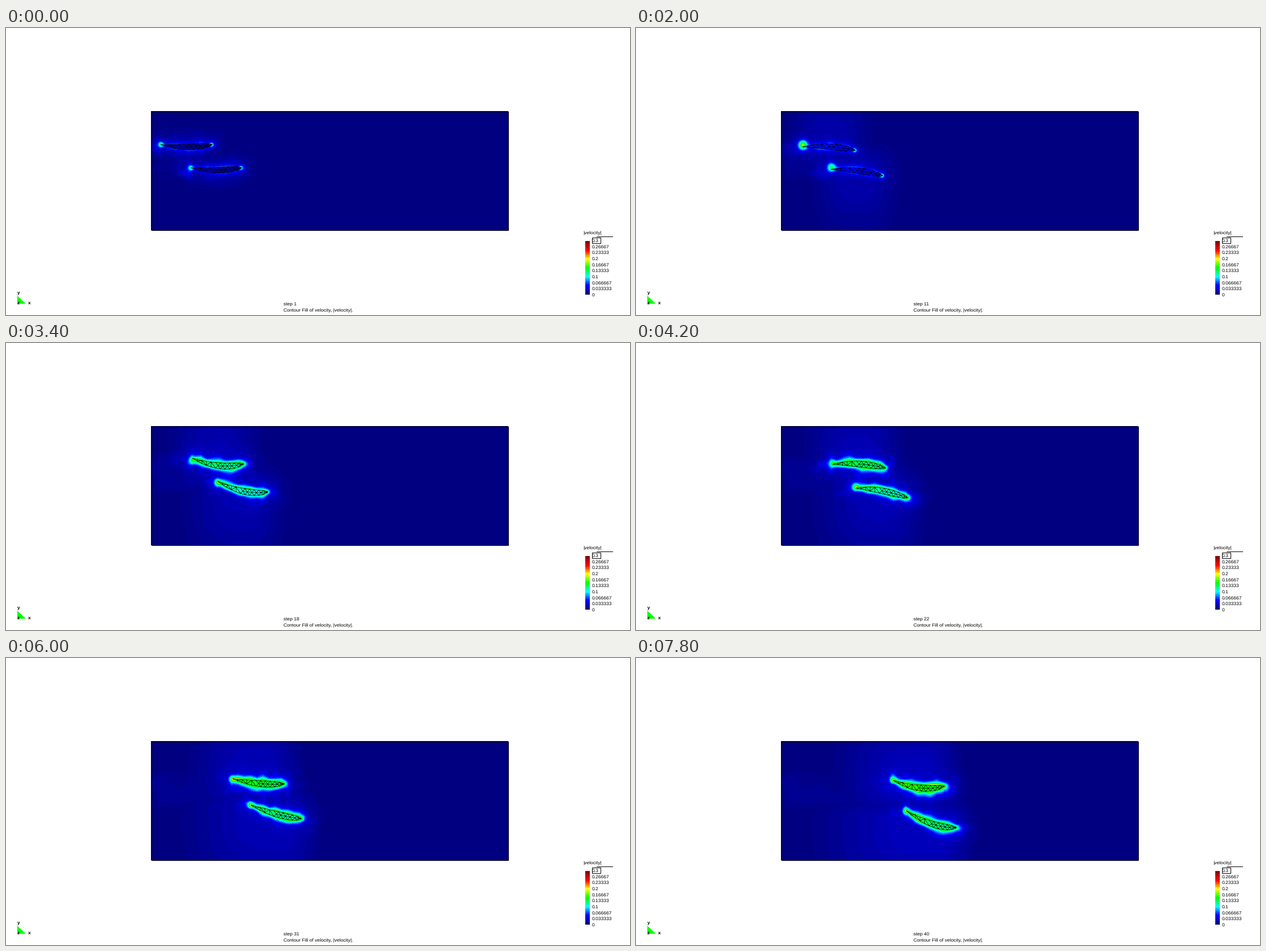
Write a matplotlib script that moves like this. It is 1102 by 508 pixels and loops after 8000 ms.

```python
import numpy as np
import matplotlib.pyplot as plt
from matplotlib.animation import FuncAnimation
from matplotlib.colors import LinearSegmentedColormap
from matplotlib.patches import Polygon, Rectangle

W, H, DPI = 1102, 508, 100
FRAMES = 40
BEAT = 11            # steps per tail beat
VMAX, LEVELS = 0.3, 75
LEFT, TOP, COLS, ROWS = 256, 147, 631, 211
HALF_THICK = 5.4

# wall: which way the nearest wall lies; memory: how far the halo follows
UPPER = dict(x=364, span=91.5, speed=6.1, lag=9.6, y=209, sink=.16,
             dive=.0075, turn=0, wall=-1, memory=.5, tone=.11, gain=.001)
LOWER = dict(x=416, span=90, speed=5, lag=9.2, y=250, sink=.15,
             dive=.0225, turn=.5, wall=1, memory=0, tone=.1, gain=.0007)


def px(n):
    return n * 72 / DPI


def settle(t, tau):
    return 1 - np.exp(-t / tau)


# ---------- motion ----------
def pose(f, t):
    """Spine and flow strengths of one fish, t steps after the start."""
    grow = settle(t, 3)
    beat = np.cos(2 * np.pi * (t - 6) / BEAT)
    travel = f["speed"] * (t - f["lag"] * settle(t, f["lag"]))
    bow = 1 + 3 * (1 - grow) + 7 * grow * beat
    span = f["span"] - .25 * bow
    tilt = grow * (8 + f["turn"] * t + 2.2 * beat)
    mid = f["y"] + f["sink"] * t + f["dive"] * t ** 2 + .4 * bow
    head = f["x"] + travel
    body = .008 + (f["tone"] + f["gain"] * t) / (1 + np.exp((11 - t) / 2))
    kick = np.exp(-((t - 13) / 3) ** 2)
    reach = {f["wall"]: 35 + 115 * settle(t, 7), -f["wall"]: 32 + 20 * grow}
    return dict(
        span=span, bow=bow, body=body, sheath=max(body, .05),
        head_x=head, tail_x=head - span, mid_y=mid,
        head_y=mid - bow + tilt / 2, tail_y=mid - bow - tilt / 2,
        spot=.12 + .04 * (1 - beat ** 2) + .08 * kick,
        spot_size=4 + 6 * grow * np.exp(-t / 8),
        spot_dy=8 * beat * grow * np.exp(-t / 20),
        left=f["x"] - f["span"] - 15 + f["memory"] * travel,
        right=head + 17 + 16 * settle(t, 5),
        up=reach[-1], down=reach[1],
        halo=.016 + .00022 * t)


# ---------- velocity field ----------
X, Y = np.meshgrid(np.arange(COLS, dtype=np.float32) + LEFT + .5,
                   np.arange(ROWS, dtype=np.float32) + TOP + .5)


def patchy(cell, seed):
    """Bilinear random patches over the tank, 0 to 1."""
    gx, gy = (X - LEFT) / cell, (Y - TOP) / cell
    ix, iy = gx.astype(int), gy.astype(int)
    fx, fy = gx - ix, gy - iy
    n = np.random.default_rng(seed).random(
        (iy.max() + 2, ix.max() + 2)).astype(np.float32)
    low = n[iy, ix] * (1 - fx) + n[iy, ix + 1] * fx
    high = n[iy + 1, ix] * (1 - fx) + n[iy + 1, ix + 1] * fx
    return low * (1 - fy) + high * fy


FINE, COARSE = patchy(11, 3), patchy(24, 8)


def half_thickness(u):
    u = np.clip(u, 0, 1)
    return HALF_THICK * u * (1 - u) ** .6 / .347


def spine(p, u):
    return (p["tail_y"] + (p["head_y"] - p["tail_y"]) * u
            + 4 * p["bow"] * u * (1 - u))


def spot(x, y, size, amp):
    r2 = (X - x) ** 2 + (Y - y) ** 2
    return amp * (.65 * np.exp(-r2 / (2 * size ** 2))
                  + .35 * np.exp(-np.sqrt(r2) / (2.2 * size)))


def halo(p):
    """Nested wide bands around a fish, stretched towards the near wall."""
    cx = (p["tail_x"] + p["head_x"]) / 2
    dx, dy = X - cx, Y - p["mid_y"]
    ex = dx / np.where(dx < 0, cx - p["left"], p["right"] - cx)
    ey = dy / np.where(dy < 0, p["up"], p["down"])
    q = 1 - np.cbrt(np.abs(ex) ** 3 + np.abs(ey) ** 3)
    rise = .0042 + (p["halo"] - .004) * np.clip(q * 1.5, 0, 1)
    return np.where(q > 0, rise, 0)


def fish_field(p):
    u = (X - p["tail_x"]) / p["span"]
    inner = np.clip(u, 0, 1)
    over = np.abs(u - inner) * p["span"]
    side = np.abs(Y - spine(p, inner)) - half_thickness(u)
    d = np.hypot(over, np.maximum(side, 0))

    near = p["sheath"] * (.7 * np.exp(-(d / 5) ** 1.3)
                          + .6 * np.exp(-d / 15) * (.35 + FINE))
    tail = spot(p["tail_x"], p["tail_y"] + p["spot_dy"],
                p["spot_size"], p["spot"]) * (.75 + .5 * FINE)
    nose = spot(p["head_x"] - 1, p["head_y"], 3.2, .12)
    back = p["tail_x"] - X
    wake = (.06 * (back > 0) * np.exp(-np.maximum(back, 0) / 32)
            * (.2 + FINE) * np.exp(-((Y - p["tail_y"] - 4) / 15) ** 2))
    flow = np.cbrt(near ** 3 + tail ** 3 + nose ** 3 + wake ** 3)
    body = np.maximum(p["body"] * (1.07 - .17 * inner),
                      np.maximum(tail, nose) * .8)
    return np.where((over == 0) & (side < 0), body, flow)


def velocity(poses, t):
    v = (.011 * settle(t, 3) * (X < poses[1]["tail_x"])
         * np.exp(-((Y - 232) / 36) ** 4) * (.15 + 1.2 * COARSE))
    for p in poses:
        v = np.maximum(v, halo(p))
    v = np.cbrt(v ** 3 + sum(fish_field(p) ** 3 for p in poses))
    return np.floor(v * LEVELS / VMAX) * VMAX / LEVELS


# ---------- fish mesh ----------
STATIONS = np.linspace(0, 1, 12)
MIXED = 5            # from here on the mesh has a middle row


def mesh(p):
    def node(u, side):
        return (p["tail_x"] + p["span"] * u,
                spine(p, u) + side * half_thickness(u))

    rim = np.linspace(0, 1, 40) ** .8
    lines = [[node(u, -1) for u in rim] + [node(u, 1) for u in rim[::-1]]]
    for k in range(1, len(STATIONS) - 1):
        a, b = STATIONS[k], STATIONS[k + 1]
        if k < MIXED:
            s = 1 if k % 2 else -1
            lines.append([node(a, -1), node(a, 1)])
            lines.append([node(a, s), node(b, -s)])
        else:
            m = (a + b) / 2
            lines.append([node(a, -1), node(m, 0), node(b, -1)])
            lines.append([node(a, 1), node(m, 0), node(b, 1)])
            lines.append([node(m, 0), node(min(m + b - a, 1), 0)])
    gap = (np.nan, np.nan)
    return np.array([q for line in lines for q in line + [gap]]).T


# ---------- stage ----------
plt.rcParams["font.family"] = "Liberation Sans"
plt.rcParams["text.hinting"] = "none"
fig = plt.figure(figsize=(W / DPI, H / DPI), dpi=DPI, facecolor="white")
ax = fig.add_axes([0, 0, 1, 1])
rainbow = LinearSegmentedColormap.from_list(
    "rainbow", ["#000080", "#0000ff", "#00ffff", "#00ff00",
                "#ffff00", "#ff0000", "#800000"], N=256)


def image(data, extent):
    return ax.imshow(data, cmap=rainbow, vmin=0, vmax=VMAX, extent=extent,
                     aspect="auto", interpolation="nearest")


def label(x, y, s, **kw):
    return ax.text(x, y, s, fontsize=px(8.5), color="black",
                   va="baseline", **kw)


def frame(x, y, w, h):
    ax.add_patch(Rectangle((x, y), w, h, fill=False, ec="black",
                           lw=px(1), zorder=3))


tank = image(np.zeros((ROWS, COLS)), (LEFT, LEFT + COLS, TOP + ROWS, TOP))
frame(256.5, 147.5, 630, 210)
meshes = [ax.plot([], [], color="black", lw=px(.75))[0] for _ in range(2)]

# legend
image(np.linspace(VMAX, 0, LEVELS)[:, None], (1023, 1031, 472, 377))
label(1019, 365, "|velocity|")
ax.plot([1043, 1071], [368.5, 368.5], color="black", lw=px(1))
for k in range(10):
    label(1035, 379 + k * 10.67, f"{VMAX * (9 - k) / 9:.5g}")
frame(1034.5, 370.5, 15, 10)

# axis triad
ax.add_patch(Polygon([(20, 474), (20, 488), (34.5, 488)], fc="#00ff00",
                     ec="none"))
for x, y, s in ((20, 470, "y"), (20, 489, "z"), (38.5, 489, "x")):
    label(x, y, s, weight="bold")

counter = label(490, 491.5, "")
label(490, 502.5, "Contour Fill of velocity, |velocity|.")

ax.set_xlim(0, W)
ax.set_ylim(H, 0)
ax.axis("off")


def update(t):
    poses = [pose(f, t) for f in (UPPER, LOWER)]
    tank.set_data(velocity(poses, t))
    for line, p in zip(meshes, poses):
        line.set_data(*mesh(p))
    counter.set_text(f"step {t + 1}")
    return [tank, counter, *meshes]


anim = FuncAnimation(fig, update, frames=FRAMES, interval=200,
                     repeat=True, repeat_delay=0, blit=False)
plt.show()
```
